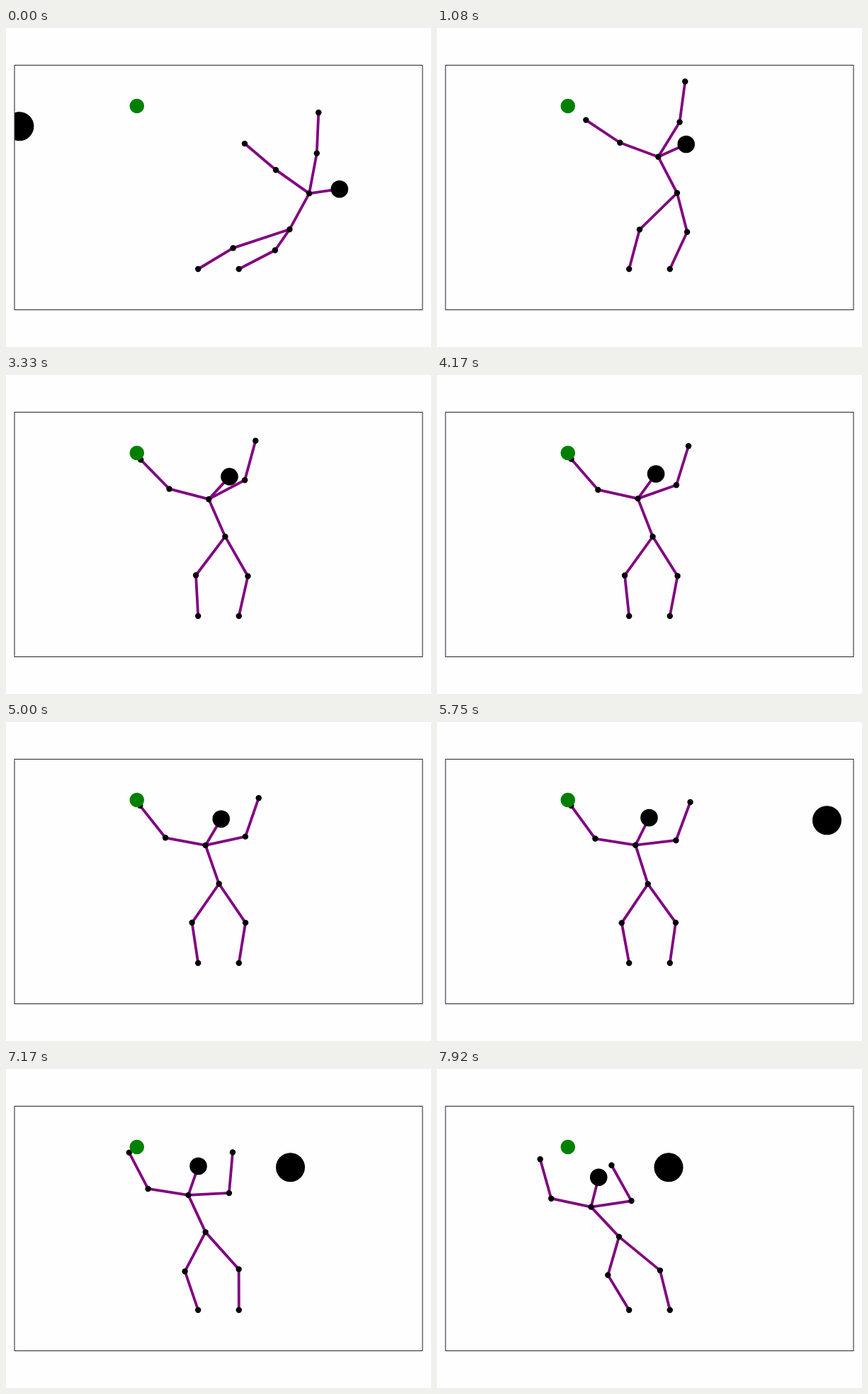
An HTML page with a canvas for the animation above (8000 ms loop, 600 by 450 pixels).

```html
<!DOCTYPE html>
<html lang="en">
<head>
<meta charset="utf-8">
<title>Stick figure reaching for a ball</title>
<style>
  html, body { margin: 0; width: 100%; height: 100%; overflow: hidden; background: #fefdff; }
  canvas { display: block; }
</style>
</head>
<body>
<canvas id="stage" width="600" height="450"></canvas>
<script>
const ctx = document.getElementById('stage').getContext('2d');
const LOOP = 8000, FRAME = 250 / 3, STEP = 70;
const LIMB = 57.6, NECK = 43.2;
const FOOT_L = [271.2, 340], FOOT_R = [328.8, 340];

// Angles are in degrees, counter-clockwise, y up.
function reach([x, y], degrees, length = LIMB) {
  const a = degrees * Math.PI / 180;
  return [x + length * Math.cos(a), y - length * Math.sin(a)];
}

function disc([x, y], radius, color = '#000') {
  ctx.fillStyle = color;
  ctx.beginPath();
  ctx.arc(x, y, radius, 0, 2 * Math.PI);
  ctx.fill();
}

function limb(...points) {
  ctx.beginPath();
  points.forEach(p => ctx.lineTo(...p));
  ctx.stroke();
}

function drawFigure(n) {
  const m = n + 1;
  const relax = Math.exp(-0.0136 * m);
  const settle = Math.exp(-0.1 * m);
  const snap = Math.exp(-0.2 * m);
  const shove = Math.max(0, (n - 94.5) / 17.5) ** 1.3;

  // Each angle relaxes to rest, with a quick reach first and a shove by the ball last.
  const angle = (rest, slow, push, medium = 0, fast = 0) =>
    rest + slow * relax + push * shove + medium * settle + fast * snap;

  const shinL = angle(112, -35.7, 16.9, -39.4, -6);
  const shinR = angle(89, -22, 19.7, -29, -10.6);
  const kneeL = reach(FOOT_L, shinL), kneeR = reach(FOOT_R, shinR);

  // The hip is the mean of where the two thighs end.
  const kneeMid = [(kneeL[0] + kneeR[0]) / 2, (kneeL[1] + kneeR[1]) / 2];
  const spread = (shinL - shinR) * Math.PI / 180;
  const hip = reach(kneeMid, (shinL + shinR) / 2, LIMB * Math.cos(spread));

  const neck = reach(hip, angle(97.6, 31.2, 28.9, -15.1, -52.3));
  const head = reach(neck, angle(90, -81.8, 3.3), NECK);
  const elbowL = reach(neck, angle(180, -28.3, -5.9, 17.3, -24.2));
  const handL = reach(elbowL, angle(112.7, 41.6, -16, 4.9, -19.3));
  const elbowR = reach(neck, angle(-28, 107.3, 13.5));
  const handR = reach(elbowR, angle(61, 26.5, 52.5));

  ctx.strokeStyle = '#800080';
  ctx.lineWidth = 3.8;
  ctx.lineJoin = 'round';
  limb(FOOT_L, kneeL, hip, kneeR, FOOT_R);
  limb(hip, neck, head);
  limb(handL, elbowL, neck, elbowR, handR);
  for (const joint of [FOOT_L, FOOT_R, kneeL, kneeR, hip, neck, elbowL, elbowR, handL, handR])
    disc(joint, 4.2);
  disc(head, 12.3);
}

function draw(now) {
  const frame = Math.min(95, Math.floor((now % LOOP + 3.4) / FRAME));
  const n = Math.floor(frame * FRAME / STEP - 0.12);
  const ballX = (1186.4 - 7.45 * n) % 1150 - 25;

  ctx.fillStyle = '#fefdff';
  ctx.fillRect(0, 0, 600, 450);
  ctx.save();
  ctx.beginPath();
  ctx.rect(12, 52.5, 576, 345);
  ctx.clip();
  drawFigure(n);
  disc([184.8, 110], 10.3, '#008000');
  disc([ballX, 138.7], 20.5);
  ctx.restore();
  ctx.strokeStyle = '#333';
  ctx.lineWidth = 1.1;
  ctx.strokeRect(12, 52.5, 576, 345);
  requestAnimationFrame(draw);
}

draw(0);
</script>
</body>
</html>
```
